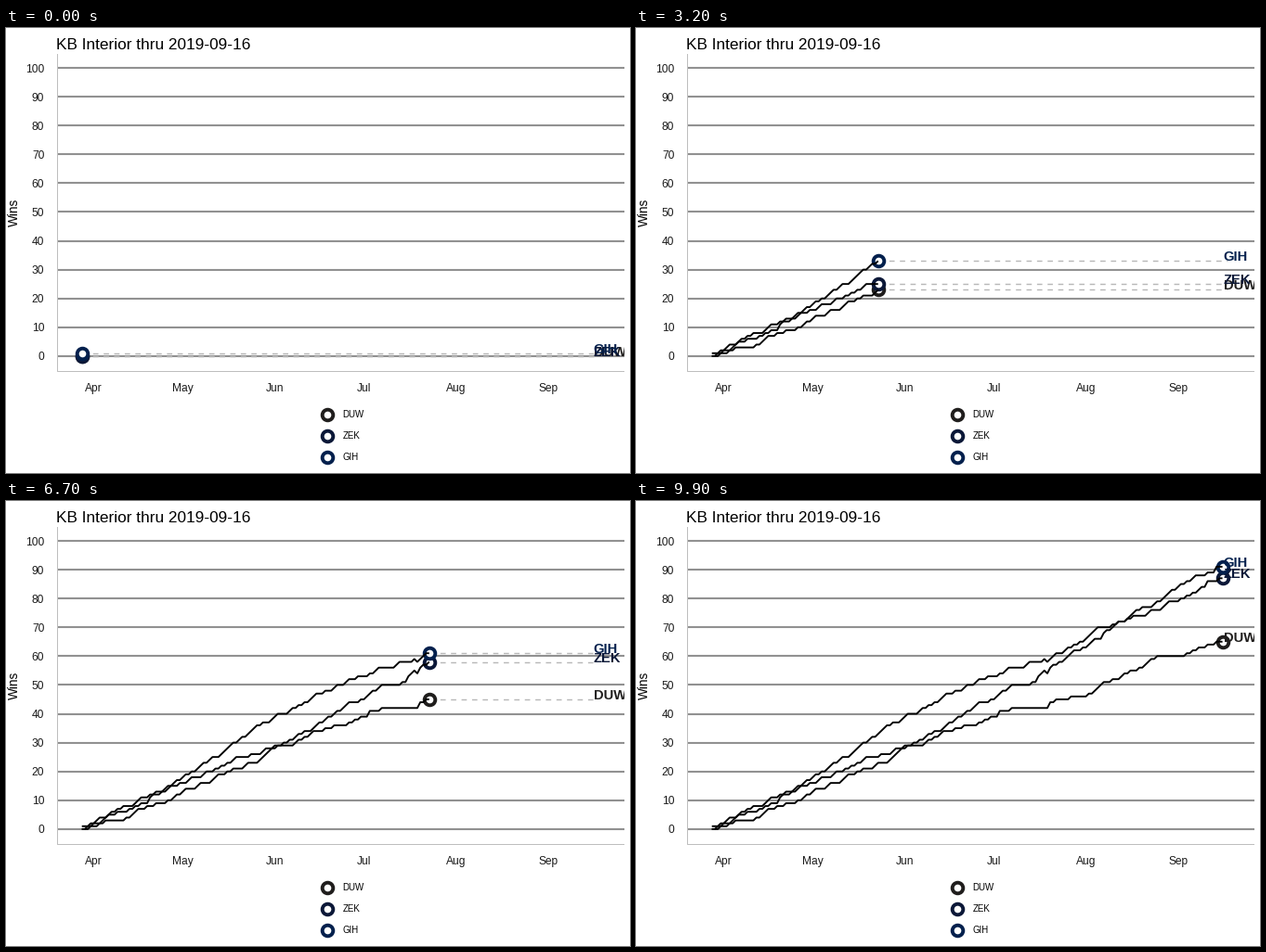
These frames come from a looping animation (672 px wide and 480 px high, 10 s). A matplotlib script:

```python
import numpy as np
import matplotlib.pyplot as plt
from matplotlib.animation import FuncAnimation
from matplotlib.patches import Rectangle

W, H, DPI = 672, 480, 96
PT = 72 / DPI
FRAMES, LAST_DAY = 100, 172
LEFT, RIGHT, TOP, BOTTOM = 54.5, 666, 28, 369.5
LABEL_X, DASH_END = 632.5, 637
MONTHS = {"Apr": 4, "May": 34, "Jun": 65, "Jul": 95, "Aug": 126, "Sep": 157}

plt.rcParams["font.family"] = "Liberation Sans"

# Winning runs as (first day, length); a repeated day counts twice,
# a negative length takes one win back.
DUW_RUNS = [
    (3, 1), (6, 1), (8, 1), (15, 1), (17, 3), (22, 1), (25, 1), (29, 1),
    (31, 2), (34, 2), (39, 2), (44, 3), (49, 1), (51, 1), (55, 2), (60, 6),
    (72, 2), (75, 1), (77, 2), (82, 1), (85, 1), (90, 1), (92, 1), (94, 1),
    (97, 1), (97, 1), (101, 1), (114, 1), (114, 1), (116, 1), (121, 1),
    (127, 1), (129, 4), (135, 1), (138, 2), (141, 1), (144, 1), (146, 3),
    (150, 1), (160, 1), (162, 1), (164, 1), (167, 1), (170, 1)]
ZEK_RUNS = [
    (2, 1), (4, 1), (7, 4), (12, 1), (14, 1), (18, 3), (23, 1), (27, 3),
    (33, 1), (36, 2), (41, 2), (45, 1), (47, 1), (49, 1), (51, 2), (57, 1),
    (61, 2), (66, 1), (68, 1), (70, 1), (72, 2), (75, 1), (78, 3), (82, 2),
    (85, 2), (88, 3), (94, 1), (96, 3), (100, 2), (108, 1), (110, 1),
    (110, 3), (113, -1), (114, 1), (114, 2), (117, 1), (119, 4), (125, 1),
    (127, 3), (132, 1), (132, 2), (135, 3), (140, 1), (142, 1), (147, 2),
    (152, 3), (158, 1), (160, 1), (162, 1), (164, 2), (167, 1), (167, 1),
    (171, 1)]
GIH_RUNS = [
    (0, 1), (3, 1), (5, 2), (9, 1), (12, 1), (16, 1), (18, 1), (20, 1),
    (23, 1), (23, 3), (29, 4), (34, 2), (37, 1), (39, 3), (43, 2), (47, 5),
    (53, 2), (56, 4), (61, 1), (64, 3), (70, 2), (73, 1), (75, 1), (77, 3),
    (82, 1), (85, 2), (89, 2), (93, 1), (97, 1), (99, 2), (106, 2),
    (112, 1), (113, -1), (114, 3), (119, 2), (122, 1), (124, 1), (126, 5),
    (135, 1), (137, 1), (140, 4), (145, 1), (149, 2), (152, 4), (157, 2),
    (160, 1), (162, 2), (167, 1), (170, 1), (170, 1)]
TEAMS = [("DUW", "#201e1d", DUW_RUNS),
         ("ZEK", "#0b1838", ZEK_RUNS),
         ("GIH", "#02204d", GIH_RUNS)]


def day_x(day):
    return 81.7 + 3.197 * day


def win_y(wins):
    return 353.9 - 3.11 * wins


def daily_wins(runs):
    gain = np.zeros(LAST_DAY + 1)
    for start, length in runs:
        gain[start:start + abs(length)] += np.sign(length)
    return gain.cumsum()


fig = plt.figure(figsize=(W / DPI, H / DPI), dpi=DPI, facecolor="white")
ax = fig.add_axes([0, 0, 1, 1])
ax.set(xlim=(0, W), ylim=(H, 0))
ax.axis("off")


def text(x, y, s, px, **kw):
    kw = {"va": "baseline", "color": "black", **kw}
    return ax.text(x, y, s, fontsize=px * PT, **kw)


def stroke(xs, ys, color, px, **kw):
    return ax.plot(xs, ys, color=color, lw=px * PT, **kw)[0]


def ring(x, y, color, z):
    return ax.plot([x], [y], "o", ms=11.6 * PT, mfc="white", mec=color,
                   mew=3.9 * PT, zorder=z)[0]


# Fixed parts of the chart
for wins in range(0, 101, 10):
    stroke([LEFT, RIGHT], [win_y(wins)] * 2, "#919191", 2.1,
           zorder=1, solid_capstyle="butt")
    text(41.3, win_y(wins) + 4.6, str(wins), 12, ha="right", color="#1a1a1a")
stroke([LEFT, LEFT, RIGHT], [TOP, BOTTOM, BOTTOM], "#bebebe", 1, zorder=1.5)
for month, day in MONTHS.items():
    text(day_x(day), 392, month, 12, ha="center", color="#1a1a1a")
text(53.5, 23, "KB Interior thru 2019-09-16", 17.3)
text(16, 199, "Wins", 13.6, rotation=90, ha="right", va="center")
ax.add_patch(Rectangle((RIGHT, 0), W - RIGHT, H, fc="white", ec="none",
                       zorder=20))

# Legend and moving parts
tracks = []
for k, (team, color, runs) in enumerate(TEAMS):
    y = 416.5 + 23 * k
    ring(345.6, y, color, 3)
    text(362.5, y + 3.7, team, 9.8)
    tracks.append((
        win_y(daily_wins(runs)),
        stroke([], [], "#b8b8b8", 1.42, zorder=2, ls=(0, (4, 4)),
               dash_capstyle="butt"),
        ring(0, 0, color, 4 + 0.1 * k),
        stroke([], [], "black", 1.9, zorder=5, solid_capstyle="butt",
               solid_joinstyle="round"),
        text(LABEL_X, 0, team, 14.7, weight="bold", color=color,
             zorder=6 + 0.1 * k),
    ))

all_x = day_x(np.arange(LAST_DAY + 1))


def update(i):
    day = int((i + 0.5) * LAST_DAY / (FRAMES - 1))
    x = all_x[day]
    artists = []
    for ys, dash, dot, line, label in tracks:
        y = ys[day]
        dash.set_data([x, DASH_END], [y, y])
        dash.set_visible(day < LAST_DAY)
        dot.set_data([x], [y])
        line.set_data(all_x[:day + 1], ys[:day + 1])
        label.set_y(y)
        artists += [dash, dot, line, label]
    return artists


anim = FuncAnimation(fig, update, frames=FRAMES, interval=100, repeat=True,
                     repeat_delay=0, blit=False)
plt.show()
```
